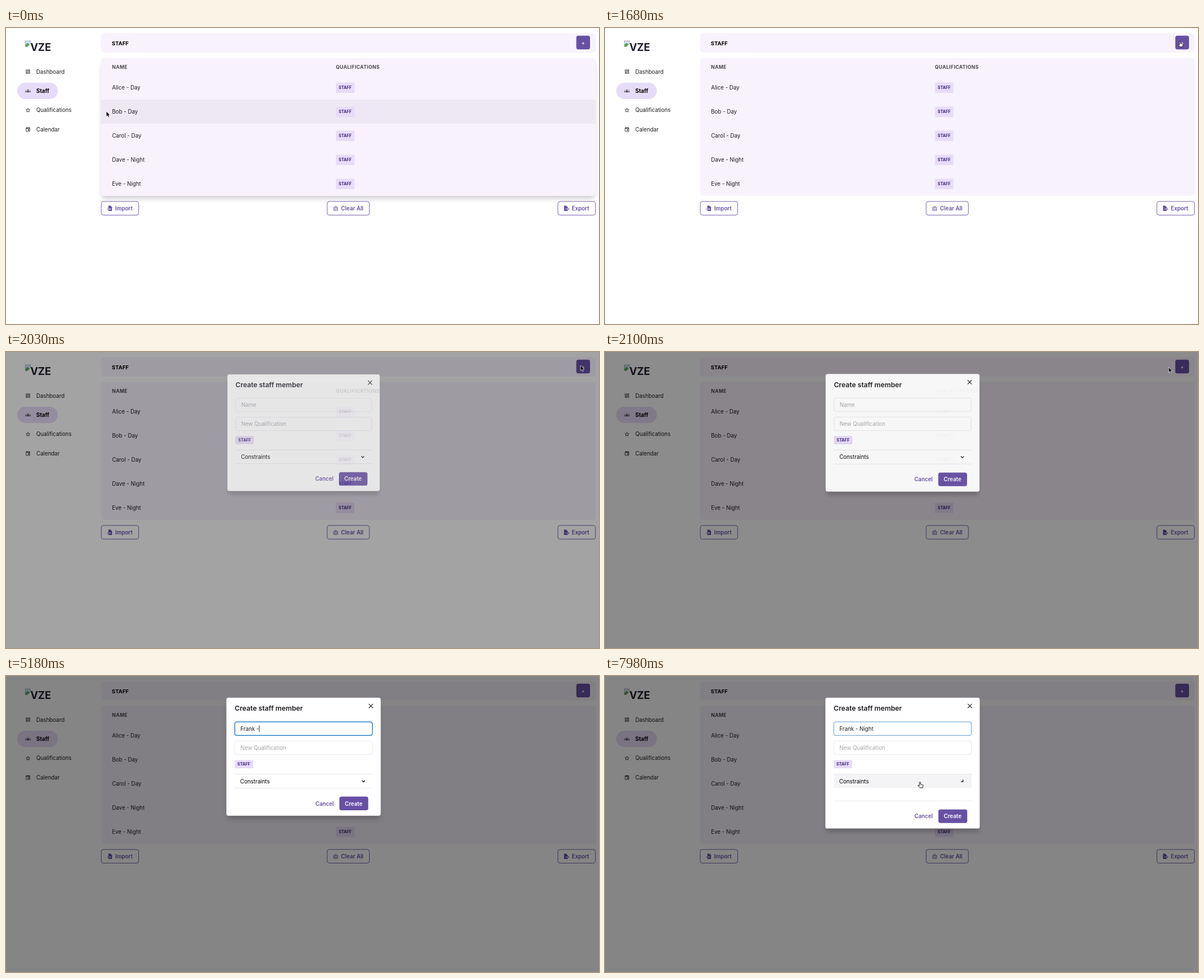
These frames come from a looping animation (1058x529 px, 8 s). An HTML page:

```html
<!DOCTYPE html>
<html lang="en">
<head>
<meta charset="utf-8">
<title>Staff</title>
<style>
  html, body { margin: 0; width: 100%; height: 100%; overflow: hidden; background: #fff; }
  svg { display: block; width: 100vw; height: 100vh; }
  text { font-family: Inter, "Open Sans", sans-serif; white-space: pre; }
</style>
</head>
<body>
<svg id="stage" viewBox="0 0 1058 529">
  <defs>
    <filter id="soft" x="-10%" y="-20%" width="120%" height="140%"><feGaussianBlur stdDeviation="4"/></filter>
  </defs>
  <g id="page"></g>
  <rect id="overlay" width="1058" height="529"/>
  <g id="modal"></g>
  <g id="cursor" stroke-linejoin="round">
    <path id="arrow" d="M0 0V9.4L2.2 7.4 3.7 10.8 5.3 10.1 3.9 6.8H6.8Z" fill="#000" stroke="#fff" stroke-width=".7"/>
    <path id="hand" d="M3 6.4V1.4a1 1 0 0 1 2 0V4.6L8.4 5.3Q9.6 5.6 9.4 6.8L8.6 10.8H4L.6 7.2Q.4 5.8 1.7 6.2L3 7.4Z" fill="#fff" stroke="#000" stroke-width=".9"/>
    <path id="beam" d="M1 .5Q3 .5 3 2V10Q3 11.5 1 11.5M5 .5Q3 .5 3 2M3 10Q3 11.5 5 11.5" fill="none" stroke="#222" stroke-width=".9"/>
  </g>
</svg>
<script>
const $ = id => document.getElementById(id);
const PURPLE = '#6750a4', INK = '#1d1b20', CARD = '#f8f2fd', BODY = 9.79, SMALL = 7.35;

// cy is the middle of the capitals
const text = (x, cy, str, { size = BODY, weight = 400, fill = INK, extra = '' } = {}) =>
  `<text x="${x}" y="${cy + size * 0.364}" font-size="${size}" font-weight="${weight}" fill="${fill}" ${extra}>${str}</text>`;
const box = (x, y, w, h, r, fill, extra = '') =>
  `<rect x="${x}" y="${y}" width="${w}" height="${h}" rx="${r}" fill="${fill}" ${extra}/>`;
const tag = (x, cy, h) =>
  box(x, cy - h / 2, 33, h, 1.2, '#e8dbfa') + text(x + 4.8, cy, 'STAFF', { size: SMALL, weight: 700, fill: '#3f2a75' });

const line = (d, color = 'currentColor') => `<path d="${d}" fill="none" stroke="${color}" stroke-width="2"/>`;
const solid = d => `<path d="${d}" fill="currentColor"/>`;
const ICONS = {
  dashboard: line('M4 4h6v8H4zM14 4h6v4h-6zM14 12h6v8h-6zM4 16h6v4H4z'),
  people: solid('M12 6a2.8 2.8 0 0 1 0 5.6a2.8 2.8 0 0 1 0-5.6M6.3 18v-1.6c0-2 2.6-3.3 5.7-3.3s5.7 1.3 5.7 3.3V18z' +
    'M4 9a2 2 0 0 1 0 4a2 2 0 0 1 0-4M20 9a2 2 0 0 1 0 4a2 2 0 0 1 0-4M0 18v-1.5C0 15 1.6 14 4.6 14q-.8 1-.8 2.4V18zM24 18v-1.5c0-1.5-1.6-2.5-4.6-2.5q.8 1 .8 2.4V18z'),
  star: line('M12 4l2.4 5.6 6.1.5-4.6 4 1.4 6-5.3-3.2-5.3 3.2 1.4-6-4.6-4 6.1-.5z'),
  calendar: line('M4 5h16v16H4zM4 8h16M8 2v4M16 2v4') + solid('M12 12h5v5h-5z'),
  import: solid('M6 1h9l6 6v16H6z') + line('M6 15h9M12 11l4 4-4 4', '#fff') + line('M0 15h6'),
  export: solid('M2 1h9l6 6v16H2z') + line('M8 15h9', '#fff') + line('M17 15h6M19 11l4 4-4 4'),
  clear: line('M2 9h20M4 9v12h16V9M9 9V4h6v5M8 13v5M12 13v5M16 13v5'),
};
const icon = (name, x, cy, color = INK, size = BODY) =>
  `<g color="${color}" transform="translate(${x} ${cy - size / 2}) scale(${size / 24})">${ICONS[name]}</g>`;

const navItem = (name, label, i) => {
  const cy = 78 + i * 34.4, active = label === 'Staff';
  return (active ? box(20, cy - 14.6, 72.5, 29.2, 14.6, '#e7dcf8') : '') +
    icon(name, 34.3, cy) + text(54, cy, label, active ? { weight: 700, fill: '#000' } : {});
};
const outlineButton = (name, label, x, w) =>
  box(x, 310, w, 24.4, 3.7, '#fff', `stroke="${PURPLE}" stroke-width=".9"`) +
  icon(name, x + 10, 322.3, PURPLE, 10.4) + text(x + 24.8, 322.3, label, { weight: 600, fill: PURPLE });

const column = { size: 8.57, weight: 700, fill: '#49454e', extra: 'letter-spacing=".43"' };
const people = ['Alice - Day', 'Bob - Day', 'Carol - Day', 'Dave - Night', 'Eve - Night'];

$('page').innerHTML =
  box(34.6, 23, 9, 10.5, 0, '#d3e2f6', 'stroke="#9a9a9f" stroke-width=".8"') +
  '<path d="M35 33v-3l3-3.5 5 3.5-4 3z" fill="#58a55c"/><path d="M44.5 27.5l-6.5 6.5h6.5z" fill="#fff"/>' +
  text(43.4, 34, 'VZE', { size: 18.36, weight: 700, fill: '#1f1d2b' }) +
  [['dashboard', 'Dashboard'], ['people', 'Staff'], ['star', 'Qualifications'], ['calendar', 'Calendar']]
    .map(([name, label], i) => navItem(name, label, i)).join('') +
  box(169.5, 9.5, 882.5, 34.3, 6, CARD) +
  text(188.8, 27.2, 'STAFF', { weight: 700, fill: '#000', size: 9.6 }) +
  box(1017.5, 13.7, 24.5, 24.6, 3.7, PURPLE) +
  text(1029.7, 26, '+', { weight: 500, fill: '#fff', extra: 'text-anchor="middle"' }) +
  box(171, 62, 879.5, 243, 6, '#1c1030', 'id="cardShadow" filter="url(#soft)"') +
  box(169.5, 53.5, 882.5, 246.5, 6, CARD) +
  box(169.5, 128, 882.5, 43, 0, '#eee8f4', 'id="rowHover"') +
  text(189.2, 69.5, 'NAME', column) + text(588.4, 69.5, 'QUALIFICATIONS', column) +
  people.map((name, i) => text(189.2, 106.7 + i * 43, name) + tag(588.6, 106.7 + i * 43, 18.6)).join('') +
  outlineButton('import', 'Import', 170, 66.7) +
  outlineButton('clear', 'Clear All', 573, 75.3) +
  outlineButton('export', 'Export', 984.7, 66.9);

const input = y => box(408.2, y, 245.5, 24.3, 3.7, '#fff', 'stroke="#e2e4ea" stroke-width=".8"');
const rule = (y, id = '') => `<path ${id} d="M408 ${y}H654" stroke="#e2e4ea" stroke-width=".8"/>`;
const hint = { fill: '#a5a5ab' };

$('modal').innerHTML =
  box(395, 45, 271.5, 211, 4, '#000', 'id="modalShadow" opacity=".2" filter="url(#soft)"') +
  box(393.2, 38.8, 275.4, 211, 3.7, '#fff', 'id="modalBody"') +
  text(408, 58, 'Create staff member', { size: 12.24, weight: 600 }) +
  '<path d="M647.6 50.2l6.8 6.8M654.4 50.2l-6.8 6.8" stroke="#222" stroke-width="1.1" stroke-linecap="round"/>' +
  input(81.9) +
  box(408.2, 81.9, 245.5, 24.3, 3.7, 'none', 'id="ring" stroke="#3182ce"') +
  text(418.3, 94.2, 'Name', { ...hint, extra: 'id="placeholder"' }) +
  text(418.3, 94.2, '', { extra: 'id="typed"' }) +
  box(0, 88.3, 0.8, 11.6, 0, '#000', 'id="caret"') +
  input(116.2) + text(418.3, 128.6, 'New Qualification', hint) +
  tag(408, 157.6, 14.8) +
  box(408, 175.5, 246, 24.8, 0, '#f4f3f5', 'id="sectionHover"') +
  rule(175.5) + rule(200.4, 'id="sectionEnd"') +
  text(417.8, 188, 'Constraints', { fill: '#000' }) +
  '<path id="chevron" d="M-2.6 -1.3L0 1.3 2.6 -1.3" fill="none" stroke="#111" stroke-width="1.3"/>' +
  '<g id="actions">' +
  text(552, 228, 'Cancel', { weight: 600, fill: PURPLE }) +
  box(594.8, 215.6, 51.5, 24.4, 3.7, PURPLE) +
  text(604.5, 228, 'Create', { weight: 600, fill: '#fff' }) + '</g>';

const NAME = 'Frank - Night';
const KEY_TIMES = [3360, 3780, 3850, 4130, 4410, 4620, 5180, 5670, 5950, 6300, 6580, 6790, 7000];
// time, x, y
const POINTER = [
  [0, 179, 149], [280, 179, 149], [490, 752, 48], [630, 752, 48], [1190, 1032, 22.5], [1540, 1032, 22.5],
  [1680, 1022, 23], [1890, 1022, 23], [1960, 1025, 24], [2030, 1025, 24], [2590, 573, 99],
  [7280, 573, 99], [7770, 558, 189], [8000, 558, 189],
];
const STEP = 70;
const clamp = v => Math.min(1, Math.max(0, v));
const ramp = (t, start, length) => clamp((t - start) / length);
const set = (id, attrs) => { for (const k in attrs) $(id).setAttribute(k, attrs[k]); };
const show = (id, on) => set(id, { visibility: on ? 'visible' : 'hidden' });

function drawPointer(t) {
  const i = POINTER.findIndex(p => p[0] > t), [t0, x0, y0] = POINTER[i - 1], [t1, x1, y1] = POINTER[i];
  const u = (t - t0) / (t1 - t0), e = u * u * (3 - 2 * u);
  const x = x0 + (x1 - x0) * e, y = y0 + (y1 - y0) * e;
  let shape = 'arrow';
  if (t >= 1400 && t < 1960 || t > 7000 && y > 170) shape = 'hand';
  else if (t >= 2590 && (y < 102 || y > 112 && y < 136)) shape = 'beam';
  set('cursor', { transform: `translate(${x} ${y})` });
  const hidden = t >= 3360 && t < 7350;
  for (const id of ['arrow', 'hand', 'beam']) show(id, id === shape && !hidden);
}

function draw(time) {
  const t = Math.floor(time / STEP) * STEP;

  const leave = 1 - ramp(t, 280, 210);
  set('cardShadow', { opacity: 0.2 * leave });
  set('rowHover', { opacity: leave });

  const open = 1 - (1 - ramp(t, 1890, 280)) ** 2;
  set('overlay', { opacity: 0.48 * open });
  set('modal', {
    opacity: open,
    transform: `translate(530.9 144.3) scale(${0.95 + 0.05 * open}) translate(-530.9 -144.3)`,
  });

  const focus = ramp(t, 2800, 280) - ramp(t, 7840, 280);
  set('ring', { opacity: Math.sqrt(focus), 'stroke-width': 0.6 + 0.9 * focus });
  const typed = KEY_TIMES.filter(k => k <= t).length;
  $('typed').textContent = NAME.slice(0, typed);
  show('placeholder', !typed);
  show('caret', t >= 2870 && t < 7350);
  set('caret', { x: 418.4 + (typed ? $('typed').getComputedTextLength() : 0) });

  const unfold = ramp(t, 7840, 140), grow = 22.8 * unfold ** 2;
  set('sectionHover', { opacity: unfold });
  set('sectionEnd', { transform: `translate(0 ${grow})` });
  set('actions', { transform: `translate(0 ${grow})` });
  set('modalBody', { height: 211 + grow });
  set('modalShadow', { height: 211 + grow });
  set('chevron', { transform: `translate(637.8 188) rotate(${-45 * unfold})` });

  drawPointer(t);
}

function loop() {
  draw(performance.now() % 8000);
  requestAnimationFrame(loop);
}
loop();
</script>
</body>
</html>
```
